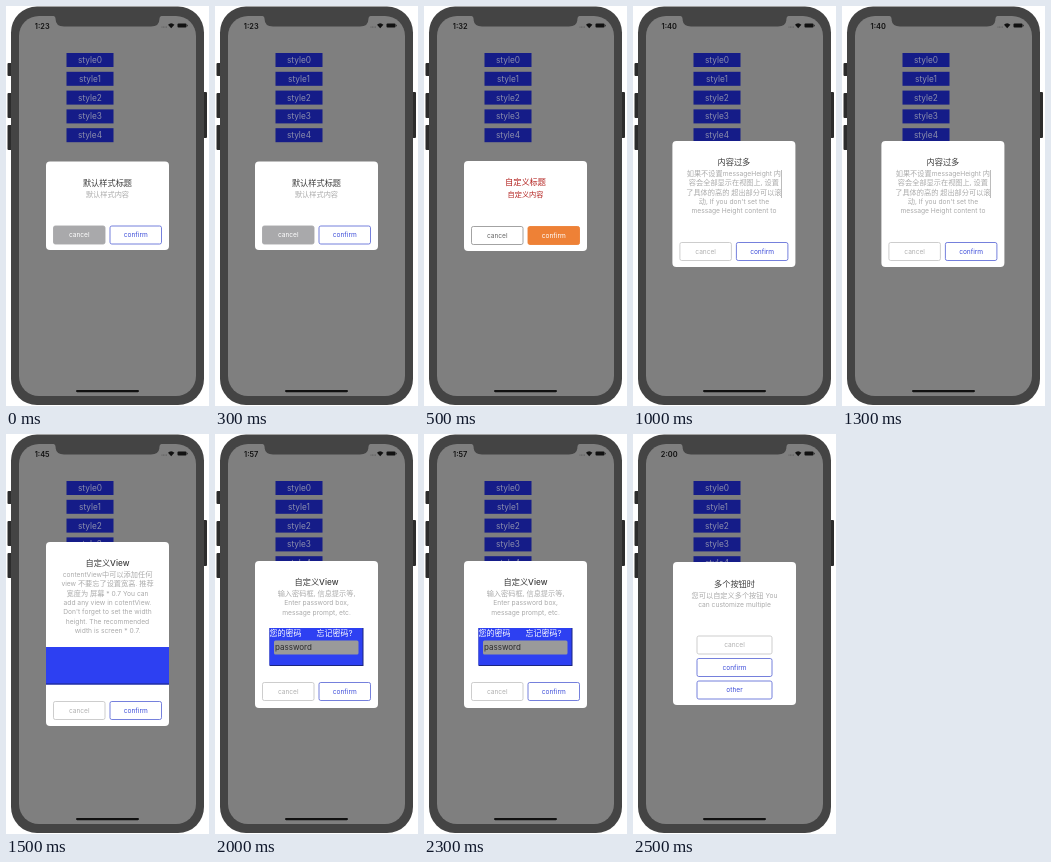
Write an HTML page that moves like this. It is 203 by 400 pixels and loops after 3 s.

```html
<!DOCTYPE html>
<html lang="zh">
<head>
<meta charset="utf-8">
<title>Alert styles</title>
<style>
html, body { margin: 0; width: 100%; height: 100%; overflow: hidden; background: #fff; }
svg { display: block; width: 100vw; height: 100vh; }
text { font-family: Inter, "Noto Sans CJK SC", "Noto Sans CJK", sans-serif; text-anchor: middle; white-space: pre; }
.time { font-size: 7.4px; font-weight: 600; fill: #111; }
.style { font-size: 8.3px; fill: #8c8eac; }
.title { font-size: 8.2px; font-weight: 500; fill: #3c3c3c; }
.body { font-size: 7.2px; fill: #aaa; }
.body .latin { font-size: 6.7px; }
.label { font-size: 6.6px; }
.field { font-size: 8px; text-anchor: start; }
.scene { visibility: hidden; animation: show 3s step-end infinite; }
@keyframes show { 0% { visibility: visible; } 16.6667%, 100% { visibility: hidden; } }
</style>
</head>
<body>
<svg id="stage" viewBox="0 0 203 400" preserveAspectRatio="none">
  <g fill="#2c2c2c">
    <rect x="1.5" y="57" width="6" height="13" rx="1"/>
    <rect x="1.5" y="87" width="6" height="25" rx="1"/>
    <rect x="1.5" y="119" width="6" height="25" rx="1"/>
    <rect x="195" y="86" width="6" height="46" rx="1"/>
  </g>
  <rect x="5" y=".5" width="193" height="398.500" rx="26" fill="#444"/>
  <rect x="13" y="10" width="177" height="380" rx="20" fill="#7f7f7f"/>
  <path d="M46 9.500H157Q153.500 10 153.500 12.500Q153.500 20.500 145 20.500H58Q49.500 20.500 49.500 12.500Q49.500 10 46 9.500Z" fill="#444"/>
  <g fill="#555">
    <circle cx="156" cy="21" r=".5"/><circle cx="157.500" cy="21" r=".5"/>
    <circle cx="159" cy="21" r=".5"/><circle cx="160.500" cy="21" r=".5"/>
  </g>
  <g fill="#111">
    <path d="M162 18.700Q165.200 15.700 168.400 18.700L165.200 22.200Z"/>
    <rect x="171.500" y="17.400" width="9" height="4.200" rx="1"/>
    <rect x="180.900" y="18.800" width=".7" height="1.500"/>
    <rect x="70" y="384" width="63" height="2.200" rx="1.100"/>
  </g>
</svg>
<script>
const CX = 101.5;
const BLUE = '#2d40f2', NAVY = '#1a2580', RED = '#b3221f';
const stage = document.getElementById('stage');

const rect = (x, y, w, h, fill, extra = '') =>
  `<rect x="${x}" y="${y}" width="${w}" height="${h}" fill="${fill}" ${extra}/>`;

// y is the vertical centre of the line
const text = (cls, x, y, str, fill) =>
  `<text class="${cls}" x="${x}" y="${y + 2.7}"${fill ? ` style="fill:${fill}"` : ''}>${
    str.replace(/[\x20-\x7e]+/g, '<tspan class="latin">$&</tspan>')}</text>`;

const lines = (y, list, fill) =>
  list.map((s, i) => text('body', CX, y + i * 9.4, s, fill)).join('');

const button = (x, y, w, label, { fill = '#fff', line = fill, ink = line } = {}) =>
  rect(x + .5, y + .5, w - 1, 18, fill, `rx="1.8" stroke="${line}" stroke-width=".9"`) +
  text('label', x + w / 2, y + 9.2, label, ink);

const PALE = { line: '#c8c8c8', ink: '#b0b0b0' };
const ACCENT = { line: '#6672d8', ink: '#3f4fd9' };
const pair = (y, left = PALE, right = ACCENT) =>
  button(47, y, 52.5, 'cancel', left) + button(103.5, y, 52.5, 'confirm', right);

const card = (top, bottom, content) =>
  rect(40, top, 123, bottom - top, '#fff', 'rx="4"') + content;

const scenes = [
  ['1:23', card(155.5, 244,
    text('title', CX, 177, '默认样式标题') + lines(188, ['默认样式内容']) +
    pair(219.5, { fill: '#a9a9ab', ink: '#fff' }))],
  ['1:32', card(155, 245,
    text('title', CX, 176.5, '自定义标题', RED) + lines(188, ['自定义内容'], RED) +
    pair(220, { line: '#999', ink: '#666' }, { fill: '#ee8136', ink: '#fff' }))],
  ['1:40', card(135, 261,
    text('title', CX, 156, '内容过多') +
    lines(167, ['如果不设置messageHeight 内', '容会全部显示在视图上, 设置',
      '了具体的高的 超出部分可以滚', "动, If you don't set the", 'message Height content to']) +
    rect(148.6, 164, .9, 28, '#b5b5b5') + pair(236)), -.6],
  ['1:45', card(108, 292,
    text('title', CX, 129, '自定义View') +
    lines(140, ['contentView中可以添加任何', 'view 不要忘了设置宽高. 推荐',
      '宽度为 屏幕 * 0.7 You can', 'add any view in cotentView.',
      "Don't forget to set the width", 'height. The recommended', 'width is screen * 0.7.']) +
    rect(40, 213, 123, 37.5, BLUE) + rect(40, 249.5, 123, 1, NAVY) + pair(267))],
  ['1:57', card(127, 274,
    text('title', CX, 148, '自定义View') +
    lines(159, ['输入密码框, 信息提示等,', 'Enter password box,', 'message prompt, etc.']) +
    rect(54.5, 194, 94, 38, NAVY) + rect(54.5, 194, 93, 37, BLUE) +
    text('field', 54.5, 199, '您的密码', '#fff') + text('field', 101.5, 199, '忘记密码?', '#fff') +
    rect(59, 206.5, 84.5, 14, '#9a9a9a', 'rx="1.5"') +
    text('field', 60, 213, 'password', '#2b2b2b') + pair(248))],
  ['2:00', card(128, 271,
    text('title', CX, 150, '多个按钮时') +
    lines(161, ['您可以自定义多个按钮 You', 'can customize multiple']) +
    ['cancel', 'confirm', 'other'].map((label, i) =>
      button(63.5, 201.5 + i * 22.5, 76, label, i ? ACCENT : PALE)).join(''))]
];

let html = '';
for (let i = 0; i < 5; i++) {
  const y = 47 + i * 18.8;
  html += rect(60.5, y, 47, 14, '#151c88') + text('style', 84, y + 7.2, 'style' + i);
}
scenes.forEach(([time, content, dx = 0], i) => {
  html += `<g class="scene" style="animation-delay:${i ? i * 500 - 3000 : 0}ms">${
    text('time', 36.2, 20, time)}<g transform="translate(${dx})">${content}</g></g>`;
});
stage.insertAdjacentHTML('beforeend', html);
</script>
</body>
</html>
```
